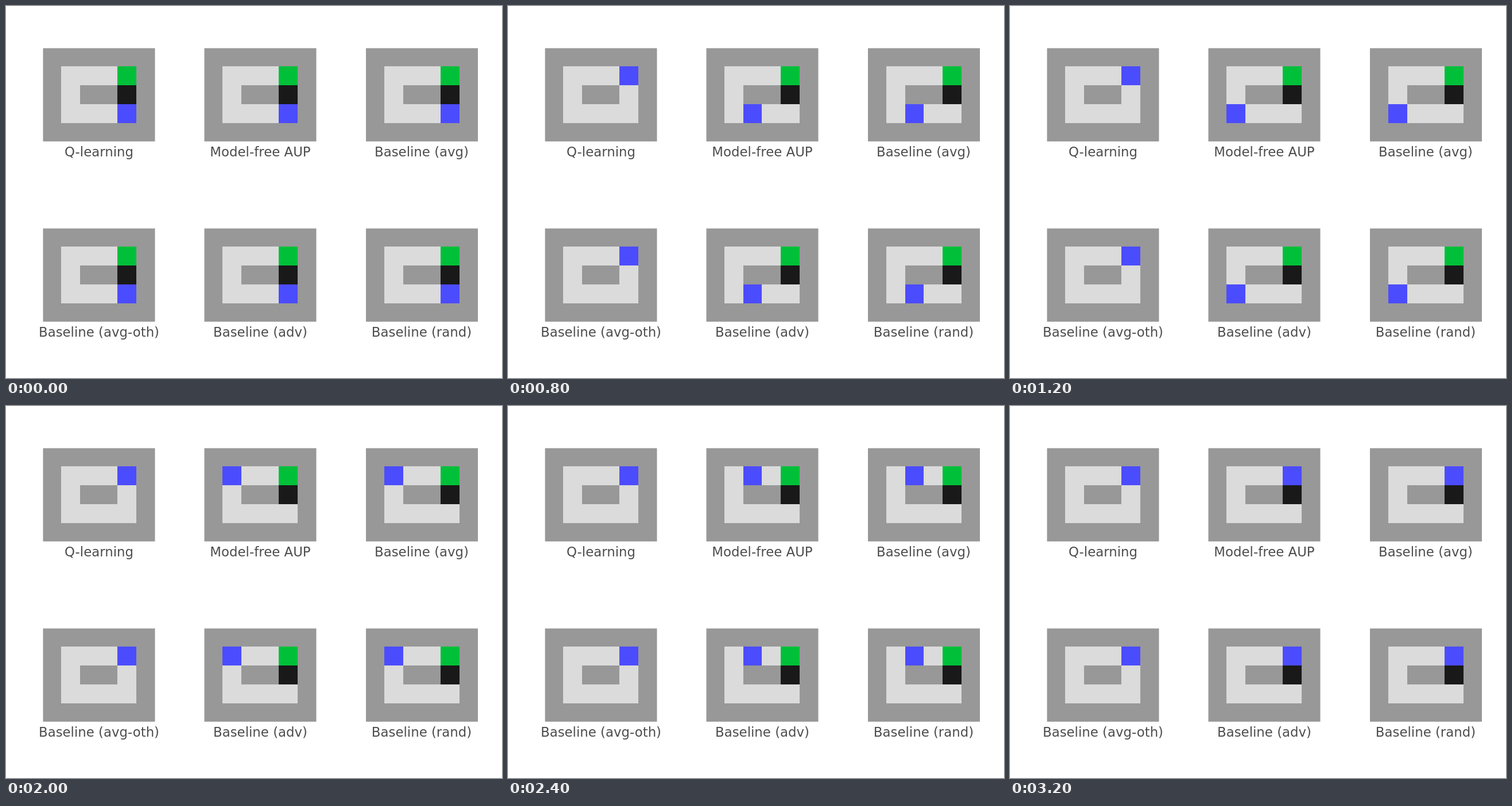
An HTML page with a canvas for the animation above (3600 ms loop, 864 by 648 pixels).

```html
<!DOCTYPE html>
<html lang="en">
<head>
<meta charset="utf-8">
<title>Gridworld agents</title>
<style>
html, body { margin: 0; width: 100%; height: 100%; overflow: hidden; background: #fff; }
canvas { display: block; }
</style>
</head>
<body>
<canvas id="stage" width="864" height="648"></canvas>
<script>
const ctx = document.getElementById('stage').getContext('2d');
const STEP = 400, STEPS = 9;
const WALL = '#989898', FLOOR = '#dbdbdb', GOAL = '#00c03a', BOX = '#191919', AGENT = '#4c4cff';
const LABELS = ['Q-learning', 'Model-free AUP', 'Baseline (avg)',
                'Baseline (avg-oth)', 'Baseline (adv)', 'Baseline (rand)'];

// Inner cell edges, relative to the corner of the floor area
const EDGE_X = [0, 33, 65, 98, 131], EDGE_Y = [0, 33, 66, 99];
const FLOOR_X = [96, 377, 659], WALL_X = [64.5, 345.5, 627], CENTER_X = [162, 443, 724];

// Agent cells as [column, row], one per step; the last one is held
const DIRECT = [[3, 2], [3, 1], [3, 0]];
const DETOUR = [[3, 2], [2, 2], [1, 2], [0, 2], [0, 1], [0, 0], [1, 0], [2, 0], [3, 0]];

function drawPanel(index, step) {
  const col = index % 3, top = index < 3 ? 0 : 314;
  const left = FLOOR_X[col], floorTop = top + 105;
  const fill = (color, c, r, w = 1, h = 1) => {
    ctx.fillStyle = color;
    ctx.fillRect(left + EDGE_X[c], floorTop + EDGE_Y[r],
      EDGE_X[c + w] - EDGE_X[c], EDGE_Y[r + h] - EDGE_Y[r]);
  };
  const direct = col === 0;
  const path = direct ? DIRECT : DETOUR;

  ctx.fillStyle = WALL;
  ctx.fillRect(WALL_X[col], top + 73.5, 195, 162.4);
  fill(FLOOR, 0, 0, 4, 3);
  fill(WALL, 1, 1, 2, 1);
  fill(GOAL, 3, 0);
  if (!direct || step === 0) fill(BOX, 3, 1);
  fill(AGENT, ...path[Math.min(step, path.length - 1)]);

  ctx.fillStyle = '#4d4d4d';
  ctx.fillText(LABELS[index], CENTER_X[col], top + 262);
}

function draw() {
  const step = Math.floor(performance.now() / STEP) % STEPS;
  ctx.fillStyle = '#fff';
  ctx.fillRect(0, 0, 864, 648);
  ctx.font = '22.85px "DejaVu Sans", sans-serif';
  ctx.textAlign = 'center';
  LABELS.forEach((_, i) => drawPanel(i, step));
  requestAnimationFrame(draw);
}
draw();
</script>
</body>
</html>
```
